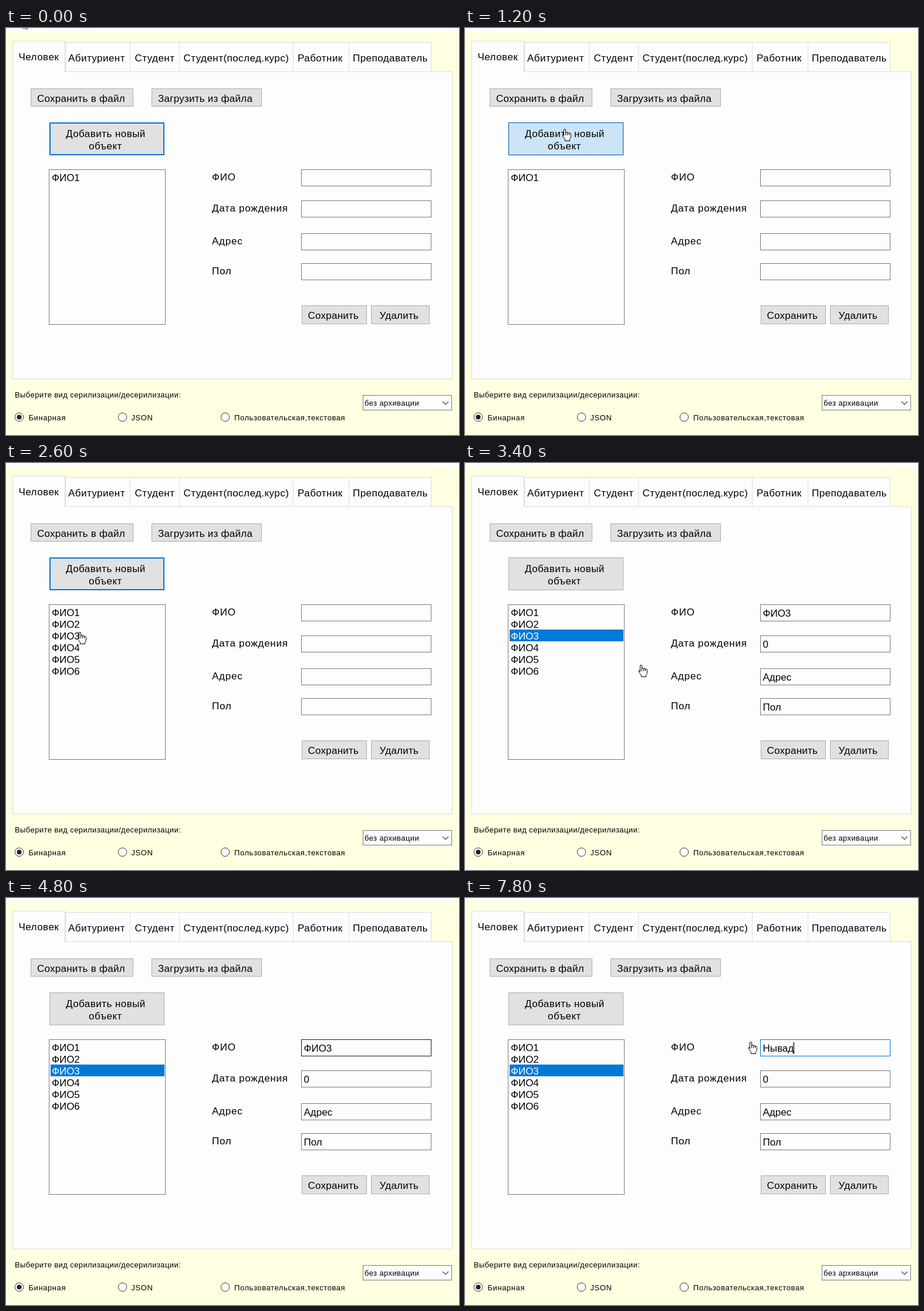
Animation, 772 px wide and 694 px high, one loop 8 s. Source, as an HTML page:

```html
<!DOCTYPE html>
<html lang="ru">
<head>
<meta charset="utf-8">
<title>Форма</title>
<style>
html, body { margin: 0; width: 100%; height: 100%; overflow: hidden; background: #ffffe1; }
svg { display: block; width: 100%; height: 100%; }
text { font: 17px "Liberation Sans", Arial, sans-serif; letter-spacing: .45px; fill: #000; white-space: pre; }
text.button { letter-spacing: .25px; }
text.label { letter-spacing: .75px; }
text.value { letter-spacing: 0; }
text.small { font-size: 13px; letter-spacing: .4px; }
text.option { font-size: 13px; letter-spacing: .58px; }
</style>
</head>
<body>
<svg id="stage" viewBox="0 0 772 694"></svg>
<script>
const LOOP = 8000;
const PAPER = '#fdfdfd', GRAY = '#7a7a7a', BLUE = '#0078d7';
const stage = document.getElementById('stage');

// Boxes are given by their outer edges; the border lies inside.
const box = (x, y, right, bottom, fill, stroke, extra = '') =>
  `<rect x="${x + .5}" y="${y + .5}" width="${right - x - 1}" height="${bottom - y - 1}" fill="${fill}" stroke="${stroke}" ${extra}/>`;
const text = (x, y, str, cls = '') => `<text x="${x}" y="${y}" class="${cls}">${str}</text>`;
const button = (x, y, right, bottom, textX, label) =>
  box(x, y, right, bottom, '#e1e1e1', '#adadad') + text(textX, y + 23, label, 'button');
const tab = (x, right, textX, label) =>
  box(x, 24, right, 75, PAPER, '#dcdcdc') + text(textX, 57, label);
const radio = (x, textX, label, on) =>
  `<circle cx="${x}" cy="663.5" r="7.2" fill="${PAPER}" stroke="#333"/>` +
  (on ? `<circle cx="${x}" cy="663.5" r="4" fill="#222"/>` : '') +
  text(textX, 669, label, 'option');

const fields = [
  { top: 241, labelY: 260, label: 'ФИО', value: 'ФИО3' },
  { top: 294, labelY: 313, label: 'Дата рождения', value: '0' },
  { top: 350, labelY: 369, label: 'Адрес', value: 'Адрес' },
  { top: 401, labelY: 420, label: 'Пол', value: 'Пол' },
];
const items = [1, 2, 3, 4, 5, 6];

stage.innerHTML = `
  <rect width="772" height="694" fill="#ffffe1"/>
  <rect width="772" height="7" fill="${PAPER}"/>
  ${box(11, 74, 761, 599, PAPER, '#dcdcdc')}
  ${tab(101, 212, 106, 'Абитуриент')}
  ${tab(211, 296, 219.5, 'Студент')}
  ${tab(295, 490, 302.5, 'Студент(послед.курс)')}
  ${tab(489, 585, 497, 'Работник')}
  ${tab(584, 725, 591, 'Преподаватель')}
  <path d="M11.5 76V22.5H100.5V74" fill="${PAPER}" stroke="#dcdcdc"/>
  <path d="M12 74.5H100" stroke="${PAPER}"/>
  ${text(21.5, 55, 'Человек')}
  ${button(42, 103, 217, 134, 53, 'Сохранить в файл')}
  ${button(248, 103, 436, 134, 259, 'Загрузить из файла')}
  <rect id="add"/>
  ${text(102, 186, 'Добавить новый')}
  ${text(141, 207, 'объект')}
  ${box(73, 241, 272, 506, PAPER, GRAY)}
  <rect id="row" x="76" y="284" width="194" height="20" fill="${BLUE}"/>
  ${items.map(n => text(78, 241 + 20 * n, 'ФИО' + n, 'value item')).join('')}
  ${fields.map(f =>
    text(351, f.labelY, f.label, 'label') +
    box(503, f.top, 725, f.top + 29, PAPER, GRAY, 'class="frame"')).join('')}
  <rect id="mark" y="246" height="20" fill="${BLUE}"/>
  ${fields.map(f => text(507.5, f.top + 21, '', 'value entry')).join('')}
  <rect id="caret" y="246" width="1.3" height="20"/>
  ${button(504, 473, 615, 505, 514.5, 'Сохранить')}
  ${button(622, 473, 722, 505, 636.5, 'Удалить')}
  ${text(15, 630, 'Выберите вид серилизации/десерилизации:', 'small')}
  ${radio(22.5, 38.5, 'Бинарная', true)}
  ${radio(198.5, 213.5, 'JSON')}
  ${radio(373.5, 389, 'Пользовательская,текстовая')}
  ${box(608, 626, 760, 652, PAPER, GRAY)}
  ${text(611, 644, 'без архивации', 'small')}
  <path d="M744 637l5 5 5-5" fill="none" stroke="#444" stroke-width="1.2"/>
  <g id="busy" fill="${PAPER}" stroke="#222"><path d="M27 -1l3 3"/><circle cx="34.5" cy="-.5" r="2.6"/></g>
  <path id="hand" fill="#fff" stroke="#000" stroke-linejoin="round"
    d="M-1.5 12V2Q-1.5 .5 0 .5T1.5 2V7Q1.5 5.5 3 5.5T4.5 7V8Q4.5 6.5 6 6.5T7.5 8V9Q7.5 7.5 9 7.5T10.5 9.5V14L8.5 17.5V20.5H.5V18L-3.5 12.5Q-5 10-3 9.5Z
    M1.5 7V11M4.5 8V11M7.5 9V11"/>`;

const $ = id => document.getElementById(id);
const all = cls => [...stage.querySelectorAll('.' + cls)];
const set = (el, attrs) => { for (const k in attrs) el.setAttribute(k, attrs[k]); };
const show = (el, on) => set(el, { visibility: on ? 'visible' : 'hidden' });
const [itemEls, frames, entries] = ['item', 'frame', 'entry'].map(all);

// Each track is a list of [start in ms, ...state], held until the next entry.
const at = (track, t) => track.filter(step => step[0] <= t).pop().slice(1);

const pointer = [
  [0], [500, 45, 20], [600, 80, 80], [700, 120, 130], [800, 155, 165], [900, 170, 172],
  [2200, 168, 180], [2300, 160, 204], [2400, 147, 240], [2500, 133, 274], [2600, 126, 288],
  [3400, 300, 344], [3500, 512, 395], [3900, 530, 395], [4000, 550, 391], [4100, 568, 385],
  [4200, 576, 379], [4300], [5600, 487, 245],
];
const addLook = [
  [0, 'focus'], [800, 'hover'], [1200, 'pressed'], [2100, 'hover'], [2400, 'focus'], [2900, 'idle'],
];
const looks = {
  idle: ['#e1e1e1', '#adadad', 1], focus: ['#e1e1e1', BLUE, 2],
  hover: ['#e5f1fb', BLUE, 1], pressed: ['#cce4f7', '#005499', 1],
};
const itemCount = [[0, 1], [1400, 2], [1600, 3], [1800, 4], [1900, 5], [2100, 6]];
const hovered = [[0, -1], [4300, 2], [4400, -1], [4500, 1], [4600, -1], [4700, 0], [4900, -1]];
const marked = [[0, 0], [5000, 1], [5100, 3], [5200, 4], [6000, 0]];
const typed = [[0, 'ФИО3'], [6000, 'Н'], [6600, 'Ны'], [7500, 'Ныв'], [7700, 'Ныва'], [7800, 'Нывад']];
const caretOn = [[0, false], [4900, true], [5000, false], [6000, true], [6500, false], [6600, true], [7100, false], [7500, true]];

function draw(t) {
  const [x, y] = at(pointer, t);
  show($('busy'), t < 500);
  show($('hand'), x !== undefined);
  if (x !== undefined) set($('hand'), { transform: `translate(${x} ${y})` });

  const [fill, stroke, line] = looks[at(addLook, t)[0]];
  set($('add'), {
    x: 74 + line / 2, y: 161 + line / 2, width: 196 - line, height: 56 - line,
    fill, stroke, 'stroke-width': line,
  });

  const [count] = at(itemCount, t), selected = t >= 2900, filled = t >= 3000;
  itemEls.forEach((el, i) => {
    show(el, i < count);
    el.style.fill = selected && i === 2 ? '#fff' : '#000';
  });
  show($('row'), selected);

  const [over] = at(hovered, t);
  frames.forEach((el, i) => set(el, {
    stroke: i === over ? '#171717' : i === 0 && t >= 4900 ? BLUE : GRAY,
  }));

  const [name] = at(typed, t), [marks] = at(marked, t);
  entries.forEach((el, i) => {
    const value = !filled ? '' : i ? fields[i].value : name;
    const head = i ? value : value.slice(0, value.length - marks);
    const tail = value.slice(head.length);
    const html = tail ? `${head}<tspan fill="#fff" style="fill:#fff">${tail}</tspan>` : value;
    if (el.innerHTML !== html) el.innerHTML = html;
  });
  const end = 507.5 + entries[0].getComputedTextLength();
  const from = marks ? 507.5 + (marks < 4 ? entries[0].getSubStringLength(0, 4 - marks) : 0) : end;
  set($('mark'), { x: from, width: end - from });
  set($('caret'), { x: end - .5 });
  show($('caret'), at(caretOn, t)[0]);
}

const start = performance.now();
function tick() {
  draw((performance.now() - start) % LOOP);
  requestAnimationFrame(tick);
}
tick();
</script>
</body>
</html>
```
